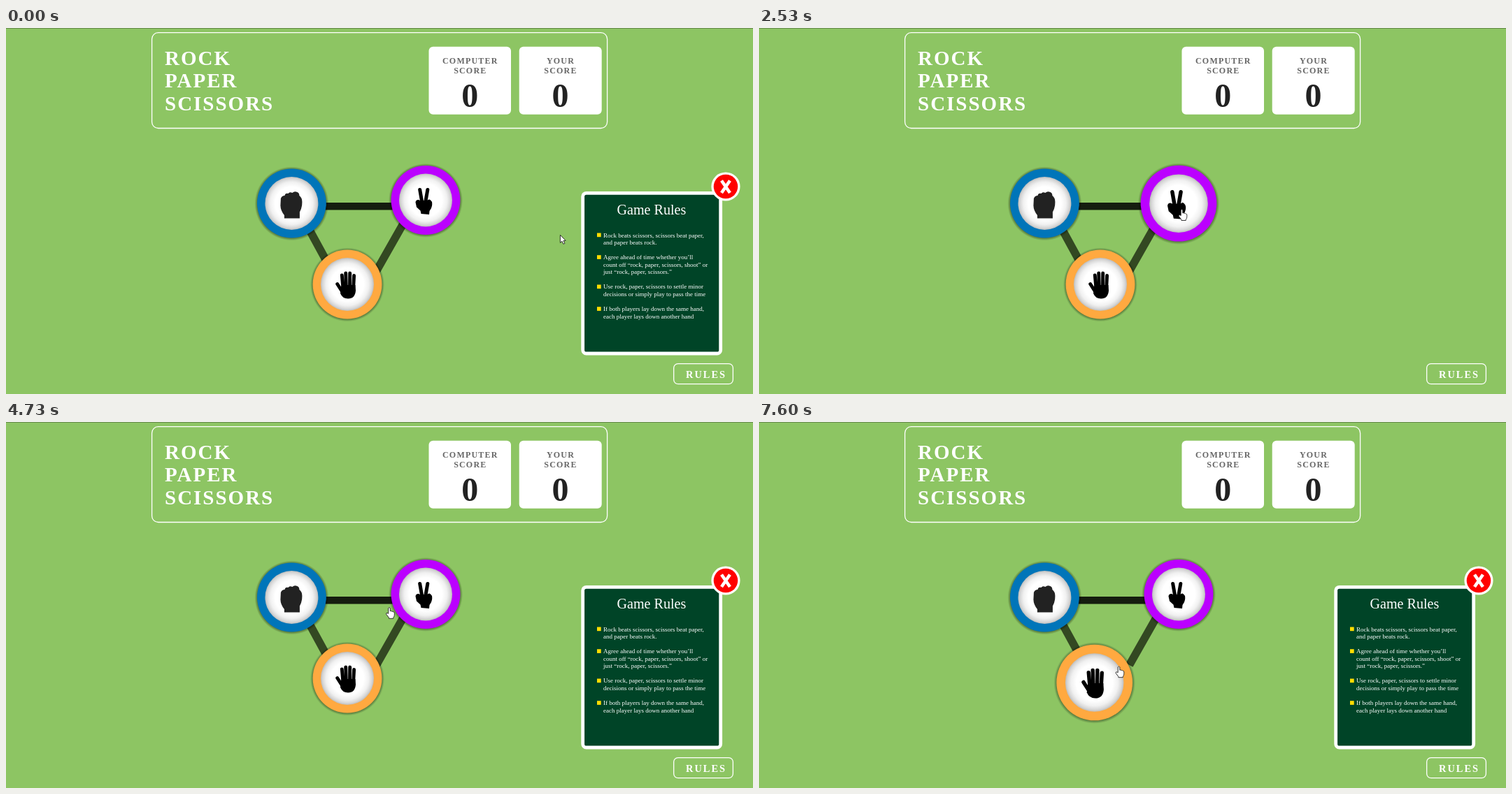
An HTML page that plays this animation: 1068x524 px, repeating every 8000 ms.

```html
<!DOCTYPE html>
<html lang="en">
<head>
<meta charset="utf-8">
<title>Rock Paper Scissors</title>
<style>
  html, body { margin: 0; width: 100%; height: 100%; overflow: hidden; background: #8dc563; }
  svg { display: block; width: 100%; height: 100%; font-family: "Liberation Serif", Tinos, serif; }
  .title { font: bold 29px "Liberation Serif", serif; letter-spacing: 2px; fill: #fff; }
  .label { font: bold 12px "Liberation Serif", serif; letter-spacing: 1.2px; fill: #666; text-anchor: middle; }
  .score { font: bold 48px "Liberation Serif", serif; fill: #222; text-anchor: middle; }
  .frame { fill: none; stroke: #fff; stroke-width: 1.3; }
  .white { fill: #fff; }
  #rules text { fill: #fff; font-size: 9px; }
  #rules .heading { font-size: 20.1px; }
</style>
</head>
<body>
<svg viewBox="0 0 1068 524">
  <defs>
    <radialGradient id="inset">
      <stop offset=".62" stop-color="#fff"/>
      <stop offset=".8" stop-color="#f1f1f1"/>
      <stop offset=".93" stop-color="#d6d6d6"/>
      <stop offset="1" stop-color="#bdbdbd"/>
    </radialGradient>
    <radialGradient id="glow">
      <stop offset=".92" stop-opacity=".42"/>
      <stop offset="1" stop-opacity="0"/>
    </radialGradient>
    <g id="disc">
      <circle cy=".4" r="53" fill="url(#glow)"/>
      <circle r="49.4" fill="currentColor"/>
      <circle r="38" fill="url(#inset)"/>
    </g>
    <path id="rock" fill="#222" d="M-10.500 21.500L-10.500 17Q-16 10-16 3L-15.500-7Q-14-11-10-11Q-9-15-5-14Q-3-17 1-15Q4-18 8-16Q11-15 11-11Q15-8 15-2Q15 7 11.500 12.500L11.500 21.500Z"/>
    <g id="scissors">
      <path d="M-8.300-15L-5 4M2.800-15L-.5 4" stroke="#000" stroke-width="5" stroke-linecap="round"/>
      <path d="M-14.500 3Q-14-1-10-.5L-7 1L3 0Q5-2 7 0Q10 2 9 8Q8.500 12 5.500 15.500L5 20.500L-6.500 19.500L-7.500 15L-13 10Z"/>
    </g>
    <g id="paper">
      <path d="M-7.700-13L-6 6M-2.300-16L-1.600 6M3.700-16L3.500 6M9.600-12.500L8.600 6M-14.300-.5L-7 11" stroke="#000" stroke-width="4.900" stroke-linecap="round"/>
      <path d="M-8.500 1L11.500 1L12 9Q11 20.500 1 20.500Q-7 20.500-10 13Z"/>
    </g>
  </defs>

  <rect width="1068" height="524" fill="#8dc563"/>
  <rect width="1068" height="1" fill="#668a4c"/>

  <rect class="frame" x="208.600" y="6.700" width="651" height="136.800" rx="9"/>
  <text class="title" x="227" y="53">ROCK</text>
  <text class="title" x="227" y="85">PAPER</text>
  <text class="title" x="227" y="117.500">SCISSORS</text>
  <rect class="white" x="604.500" y="26.700" width="117.500" height="97" rx="6"/>
  <rect class="white" x="733.700" y="26.700" width="118" height="97" rx="6"/>
  <text class="label" x="663.800" y="51.300">COMPUTER</text>
  <text class="label" x="663.800" y="65.300">SCORE</text>
  <text class="score" x="663.300" y="112.500">0</text>
  <text class="label" x="793" y="51.300">YOUR</text>
  <text class="label" x="793" y="65.300">SCORE</text>
  <text class="score" x="792.600" y="112.500">0</text>

  <rect class="frame" x="954.700" y="480.600" width="84.700" height="29" rx="6"/>
  <text x="972" y="500.700" class="white" font-size="14.400" font-weight="bold" letter-spacing="2">RULES</text>

  <g id="pick">
    <path d="M440 255.200H570" stroke="#151d0f" stroke-width="10.500"/>
    <path d="M424 271L460 337M576 266L529.500 348" stroke="#334822" stroke-width="11.500"/>
    <g transform="translate(408.400 251)" color="#0075b9"><use href="#disc"/><use href="#rock"/></g>
    <g id="pickScissors" color="#bb00ff"><use href="#disc"/><use href="#scissors"/></g>
    <g id="pickPaper" color="#ffa940"><use href="#disc"/><use href="#paper"/></g>
  </g>

  <g id="result">
    <text class="label" style="fill:#fff" x="410.200" y="193">YOU PICKED</text>
    <text class="label" style="fill:#fff" x="659" y="193">PC PICKED</text>
    <text class="title" x="476" y="233.800">TIE UP</text>
    <g transform="translate(405 255.200)" color="#bb00ff"><use href="#disc"/><use href="#scissors"/></g>
    <g id="pcScissors" color="#bb00ff"><use href="#disc"/><use href="#scissors"/></g>
    <g id="again">
      <rect class="white" x="-61.300" y="-18.200" width="122.600" height="36.400" rx="5"/>
      <text class="label" style="font-size:11.200px;letter-spacing:1px" x=".8" y="4">PLAY AGAIN</text>
    </g>
  </g>

  <g id="rules">
    <rect x="824.700" y="236.300" width="197" height="229.700" rx="5" fill="#004427" stroke="#fff" stroke-width="4.800"/>
    <text class="heading" x="873.500" y="267">Game Rules</text>
    <circle cx="1029" cy="227" r="20.600" fill="#fff"/>
    <circle cx="1029" cy="227" r="17.300" fill="#f00"/>
    <path d="M1023 218.500L1035 236M1035 218.500L1023 236" stroke="#fff" stroke-width="4.600"/>
  </g>

  <path id="arrow" fill="#fff" stroke="#222" stroke-width=".9" d="M.4.4V11.500L3 9.200L4.900 13.300L6.900 12.400L5 8.400H8.200Z"/>
  <path id="hand" fill="#fff" stroke="#222" stroke-width=".9" stroke-linejoin="round"
    d="M-1.300 9V1.200Q0-.6 1.300 1.200V5.500Q2.800 4.500 3.700 6Q5.300 5.300 6 6.800Q7.300 6.500 7.300 8V11Q7.300 13 5.800 14.800V16H-.6V14.800L-4.400 9.800Q-4.600 7.800-3 8.200Z"/>
</svg>
<script>
const LOOP = 8000, FPS = 15, HOVER_MS = 200;
const el = id => document.getElementById(id);
const clamp = v => Math.min(1, Math.max(0, v));
const within = (t, spans) => spans.some(([from, to]) => t >= from && t < to);
const show = (id, on) => el(id).setAttribute("visibility", on ? "visible" : "hidden");
const place = (id, x, y, scale = 1) =>
  el(id).setAttribute("transform", `translate(${x} ${y}) scale(${scale})`);

const ruleLines = [
  "Rock beats scissors, scissors beat paper,", "and paper beats rock.", "",
  "Agree ahead of time whether you’ll", "count off “rock, paper, scissors, shoot” or", "just “rock, paper, scissors.”", "",
  "Use rock, paper, scissors to settle minor", "decisions or simply play to pass the time", "",
  "If both players lay down the same hand,", "each player lays down another hand"
];
el("rules").innerHTML += ruleLines.map((line, i) => {
  const y = 299.5 + 10.57 * i;
  const bullet = ruleLines[i - 1] ? "" : `<rect x="845" y="${y - 6}" width="5.700" height="5.700" fill="#fd0"/>`;
  return line && `${bullet}<text x="854" y="${y}">${line}</text>`;
}).join("");

// Cursor moves: start, end, destination
const start = [792, 296];
const moves = [
  [270, 1000, 1028, 218],
  [1805, 2470, 604.5, 259.5],
  [4005, 4195, 548, 265.3],
  [5005, 5200, 610, 262],
  [6205, 6470, 541.7, 270.3],
  [7205, 7530, 514.5, 349.7]
];
const results = [[3130, 4470], [5800, 6930]];
const rulesHidden = [[1470, 4470]];
const arrows = [[0, 930], [1530, 2330], [7270, 7400]];
const hovers = {
  scissors: [[2330, 3130], [5070, 5800]],
  pc: [[3130, 4070], [5800, 6270]],
  again: [[4130, 4470], [6330, 6930]],
  paper: [[7400, 9000]]
};

function cursorAt(t) {
  let [x, y] = start;
  for (const [from, to, toX, toY] of moves) {
    const p = clamp((t - from) / (to - from)), k = p * p * (3 - 2 * p);
    x += (toX - x) * k;
    y += (toY - y) * k;
  }
  return [x, y];
}

function hover(name, t) {
  const ease = ms => { const p = clamp(ms / HOVER_MS); return p * (2 - p); };
  return Math.max(0, ...hovers[name].map(([from, to]) => t < to ? ease(t - from) : 1 - ease(t - to)));
}

function draw(t) {
  const result = within(t, results);
  show("pick", !result);
  show("result", result);
  show("rules", !within(t, rulesHidden));

  const s = hover("scissors", t), p = hover("paper", t), pc = hover("pc", t);
  place("pickScissors", 600, 246.5 + 4.7 * s, 1 + .1 * s);
  place("pickPaper", 488 - 8.3 * p, 367 + 6 * p, 1 + .1 * p);
  place("pcScissors", 653.7, 255.2 + 5 * pc, 1 + .1 * pc);
  place("again", 533.8, 270, 1 + .04 * hover("again", t));

  const isArrow = within(t, arrows), [x, y] = cursorAt(t);
  show("arrow", isArrow);
  show("hand", !isArrow);
  place("arrow", x, y);
  place("hand", x, y);
}

function tick() {
  const step = Math.floor((performance.now() % LOOP + 4) * FPS / 1000);
  draw(step * 1000 / FPS);
  requestAnimationFrame(tick);
}
tick();
</script>
</body>
</html>
```
